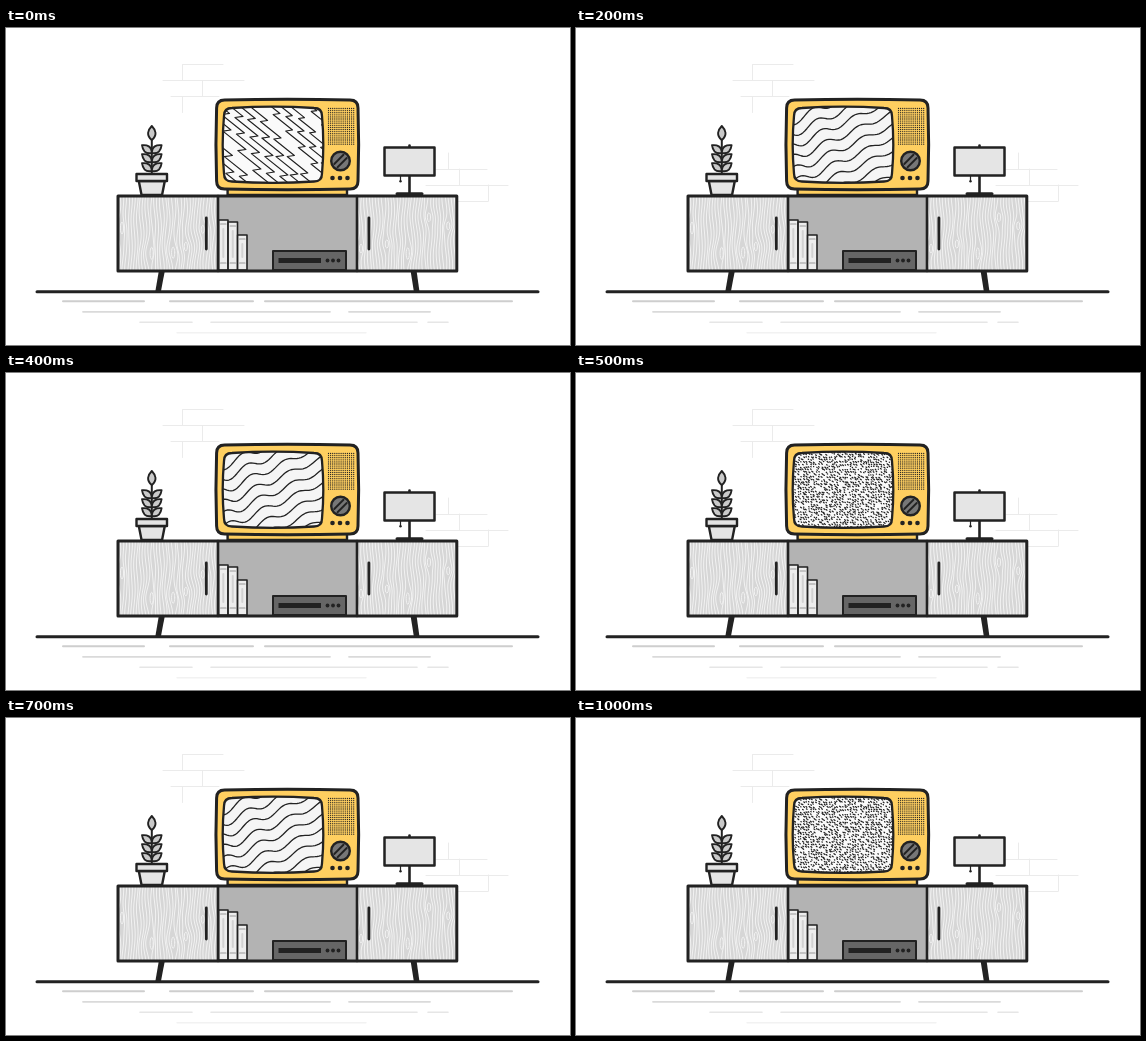
Animation of 564x317 px, one loop 1100 ms. Source, as an HTML page with a canvas:

```html
<!DOCTYPE html>
<html lang="en">
<head>
<meta charset="utf-8">
<title>Flickering television</title>
<style>
html, body { margin: 0; width: 100%; height: 100%; overflow: hidden; background: #fff; }
canvas { display: block; width: 564px; height: 317px; }
</style>
</head>
<body>
<canvas id="stage"></canvas>
<script>
const W = 564, H = 317, INK = '#222', YELLOW = '#ffcf60';
const STEP = 100;
const canvas = document.getElementById('stage');
const ratio = window.devicePixelRatio || 1;
canvas.width = W * ratio;
canvas.height = H * ratio;
const c = canvas.getContext('2d');
c.scale(ratio, ratio);
c.lineCap = c.lineJoin = 'round';

function paint(fill, stroke, width) {
  if (fill) { c.fillStyle = fill; c.fill(); }
  if (stroke) { c.strokeStyle = stroke; c.lineWidth = width; c.stroke(); }
}

function line(x1, y1, x2, y2, width, color = INK) {
  c.beginPath();
  c.moveTo(x1, y1);
  c.lineTo(x2, y2);
  paint(null, color, width);
}

function box(x1, y1, x2, y2, fill, width) {
  c.beginPath();
  c.rect(x1, y1, x2 - x1, y2 - y1);
  paint(fill, width && INK, width);
}

function dot(x, y, r, fill = INK, width = 0) {
  c.beginPath();
  c.arc(x, y, r, 0, Math.PI * 2);
  paint(fill, width && INK, width);
}

// Shape with level top and bottom edges, centred at x1 and x2
function taper(x1, y1, w1, x2, y2, w2, fill, width) {
  c.beginPath();
  c.moveTo(x1 - w1 / 2, y1);
  c.lineTo(x1 + w1 / 2, y1);
  c.lineTo(x2 + w2 / 2, y2);
  c.lineTo(x2 - w2 / 2, y2);
  c.closePath();
  paint(fill, width && INK, width);
}

// Rounded box whose sides bulge outwards by b
function bulge(x1, y1, x2, y2, r, b) {
  const mx = (x1 + x2) / 2, my = (y1 + y2) / 2;
  c.beginPath();
  c.moveTo(x1 + r, y1);
  c.quadraticCurveTo(mx, y1 - b, x2 - r, y1);
  c.quadraticCurveTo(x2, y1, x2, y1 + r);
  c.quadraticCurveTo(x2 + b, my, x2, y2 - r);
  c.quadraticCurveTo(x2, y2, x2 - r, y2);
  c.quadraticCurveTo(mx, y2 + b, x1 + r, y2);
  c.quadraticCurveTo(x1, y2, x1, y2 - r);
  c.quadraticCurveTo(x1 - b, my, x1, y1 + r);
  c.quadraticCurveTo(x1, y1, x1 + r, y1);
  c.closePath();
}

function randomizer(seed) {
  return () => (seed = (seed * 16807) % 2147483647) / 2147483647;
}

// Each course of bricks: left end, right end, upright joint
function bricks(y, jointY, courses) {
  for (const [left, right, joint] of courses) {
    line(left, y, right, y, 1, '#ebebeb');
    line(joint, jointY, joint, jointY + 16, 1, '#ebebeb');
    y += 16;
    jointY += 16;
  }
}

function floor() {
  line(31, 263.7, 532, 263.7, 3);
  const rows = [
    [57, 138, 164, 247, 259, 506],
    [77, 324, 343, 424],
    [134, 186, 205, 411, 422, 442],
    [171, 360]
  ];
  rows.forEach((ends, i) => {
    const tone = 206 + i * 12;
    for (let k = 0; k < ends.length; k += 2) {
      const y = 273.3 + i * 10.5;
      line(ends[k], y, ends[k + 1], y, 2 - i * 0.2, `rgb(${tone},${tone},${tone})`);
    }
  });
}

// Vertical grain that parts around a few random knots
function door(x1, x2, seed) {
  const rnd = randomizer(seed), knots = [];
  for (let i = 0; i < 5; i++) {
    knots.push({ x: x1 + (i + 0.2 + rnd() * 0.6) * (x2 - x1) / 5, y: 178 + rnd() * 56, h: 7 + rnd() * 5 });
  }
  c.save();
  c.beginPath();
  c.rect(x1, 168, x2 - x1, 75);
  c.clip();
  paint('#d6d6d6');
  for (let x = x1 - 4; x < x2 + 5; x += 2.9) {
    const phase = rnd() * 1.5;
    c.beginPath();
    for (let y = 167; y <= 244; y += 3) {
      let shift = Math.sin(y / 8 + x / 11 + phase);
      for (const k of knots) {
        const d = x - k.x;
        shift += Math.sign(d) * 3 * Math.exp(-(((y - k.y) / k.h) ** 2) - Math.abs(d) / 7);
      }
      c.lineTo(x + shift, y);
    }
    paint(null, '#f2f2f2', 1);
  }
  for (const k of knots) {
    c.beginPath();
    c.ellipse(k.x, k.y, 1.6, k.h / 2, 0, 0, Math.PI * 2);
    paint(null, '#f2f2f2', 1);
  }
  c.restore();
}

function book(x, y) {
  box(x, y, x + 9.4, 242, '#ededed', 1.6);
  line(x + 2, y + 4, x + 7.4, y + 4, 1.2, '#999');
  line(x + 4.7, y + 9, x + 4.7, 229, 2, '#d2d2d2');
  line(x + 2, 235, x + 7.4, 235, 1.2, '#999');
}

function cabinet() {
  taper(155.8, 243, 6, 152.2, 263, 5.6, INK);
  taper(407.6, 243, 6, 410.6, 263, 5.6, INK);
  box(212, 168, 351, 243, '#b3b3b3');
  door(112, 212, 41);
  door(351, 451, 97);
  [192, 194, 207].forEach((y, i) => book(212.6 + i * 9.5, y));
  box(267, 223, 340, 242, '#666', 2);
  box(272.5, 230, 315, 235, INK);
  for (let i = 0; i < 3; i++) dot(321.5 + i * 5.5, 232.5, 1.9);
  for (const x of [212, 351]) line(x, 168, x, 243, 2.6);
  box(112, 168, 450.8, 243, null, 3);
  for (const x of [200.3, 362.9]) line(x, 190, x, 221, 2.8);
}

function leaf(x, y, angle, length, width) {
  c.save();
  c.translate(x, y);
  c.rotate(angle);
  c.beginPath();
  c.moveTo(0, 0);
  c.bezierCurveTo(-width, -length * 0.35, -width * 0.7, -length * 0.7, 0, -length);
  c.bezierCurveTo(width * 0.7, -length * 0.7, width, -length * 0.35, 0, 0);
  paint('#cacaca', INK, 1.9);
  c.restore();
}

function plant() {
  line(145.8, 111, 145.8, 146, 2);
  leaf(145.8, 112, 0, 14, 5.8);
  for (let y = 125; y < 145; y += 9) {
    for (const side of [-1, 1]) leaf(145.8, y, side * 0.9, 12.5, 5.2);
  }
  taper(145.8, 153, 26, 145.8, 167, 20.5, '#e4e4e4', 2.4);
  box(130.5, 146, 161, 153, '#e4e4e4', 2.4);
}

function lamp() {
  line(403.5, 117.5, 403.5, 165, 2.6);
  line(391, 165.7, 416, 165.7, 3);
  line(394.5, 148, 394.5, 153, 1.2);
  dot(394.5, 153.2, 1.2);
  box(378.5, 119.5, 428.5, 147.5, '#e5e5e5', 2.5);
}

// Lightning strokes, smaller towards the right
function zigzag() {
  for (let k = -7; k < 10; k++) {
    const size = 1.15 - Math.max(0, k) * 0.06;
    let x = 214 + k * 13.5, y = 70 + (k % 3) * 3;
    c.beginPath();
    c.moveTo(x, y);
    while (y < 160) {
      c.lineTo(x += 20 * size, y += 16 * size);
      c.lineTo(x -= 7 * size, y += size);
    }
    paint(null, INK, 1.15);
  }
}

function noise() {
  const rnd = randomizer(71);
  for (let y = 78; y < 156; y += 2.5) {
    for (let x = 216; x < 319; x += 2.6) {
      const px = x + rnd() * 1.6, py = y + rnd() * 1.5, size = rnd();
      if (size > 0.18) line(px, py, px + size * 1.2, py + size * 0.9, 1.25);
    }
  }
}

// Rising curves whose ripples fade to the right
function waves() {
  for (let i = 0; i < 9; i++) {
    c.beginPath();
    for (let u = 0; u <= 104; u += 2) {
      const ripple = 4.6 * Math.exp(-u / 130) * Math.sin(u / 5.4 - i * 0.75 + 0.6);
      c.lineTo(215 + u, 94 + i * 12.5 - 0.46 * u + ripple);
    }
    paint(null, INK, 1.3);
  }
}

function knob(x, y) {
  dot(x, y, 9.3, '#777', 2.4);
  c.save();
  c.translate(x, y);
  c.rotate(-Math.PI / 4);
  for (const side of [-1, 1]) line(-6.5, side * 2.3, 6.5, side * 2.3, 1.9);
  c.restore();
}

function television(pattern) {
  box(221.6, 160, 341, 167, YELLOW, 2.4);
  bulge(210.6, 72, 352, 161, 8, 1.3);
  paint(YELLOW, INK, 3);

  const glass = () => bulge(218, 80, 316, 153.5, 8, 2.6);
  c.save();
  glass();
  paint(pattern === waves ? '#f5f5f5' : '#fafafa');
  c.clip();
  pattern();
  c.restore();
  glass();
  paint(null, INK, 2.3);

  for (let y = 80.5; y < 118; y += 2.1) {
    for (let x = 322.5; x < 348; x += 2.1) dot(x, y, 0.64);
  }
  knob(334.5, 133);
  for (let i = 0; i < 3; i++) dot(326.5 + i * 7.5, 150, 2.3);
}

const Z = zigzag, N = noise, V = waves;
const order = [Z, N, V, Z, V, N, Z, V, N, V, N];

function draw(step) {
  c.fillStyle = '#fff';
  c.fillRect(0, 0, W, H);
  bricks(36.5, 36.5, [[177, 217, 176.5], [157, 238, 196.5], [165, 213, 176.5]]);
  bricks(141.5, 125, [[430, 481, 442.5], [420, 502, 453.5], [428, 482, 482.5]]);
  floor();
  cabinet();
  plant();
  lamp();
  television(order[step]);
}

const start = performance.now();
let shown = 0;
draw(0);

function tick() {
  const step = Math.floor((performance.now() - start) / STEP) % order.length;
  if (step !== shown) draw(shown = step);
  requestAnimationFrame(tick);
}
requestAnimationFrame(tick);
</script>
</body>
</html>
```
